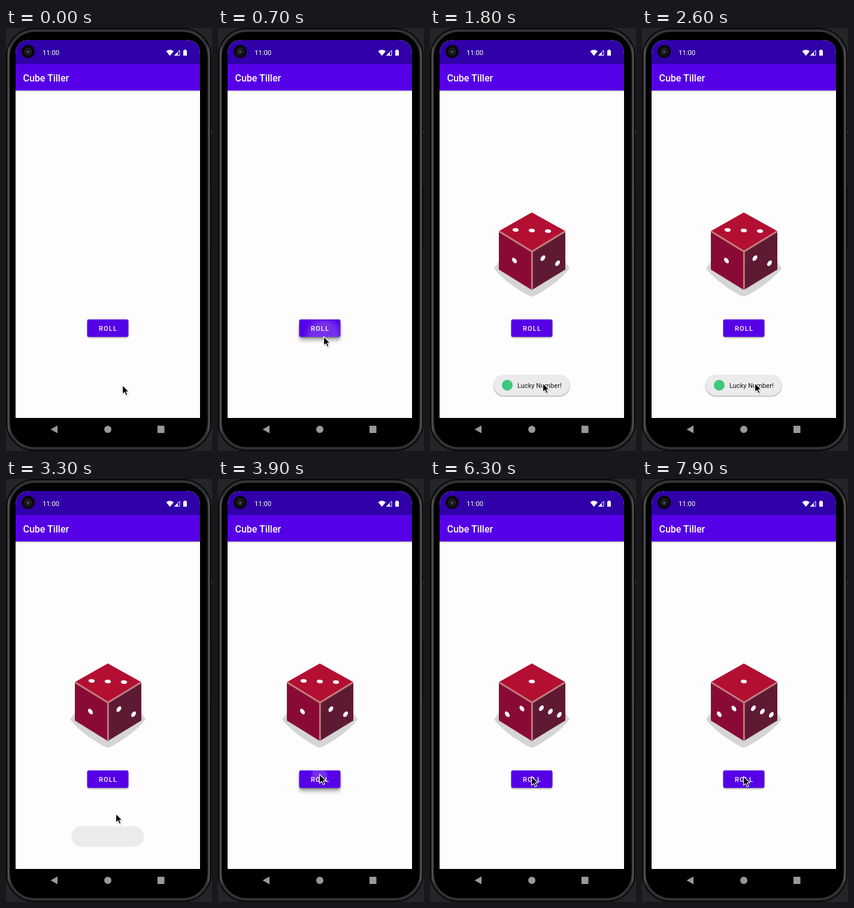
Animation, 344 px wide and 704 px high, one loop 8000 ms. Source, as an HTML page:

```html
<!DOCTYPE html>
<html lang="en">
<head>
<meta charset="utf-8">
<title>Dice app</title>
<style>
html, body { margin: 0; width: 100%; height: 100%; overflow: hidden; background: #242528; }
svg { display: block; width: 100vw; height: 100vh; }
text { font-family: Roboto, "Open Sans", sans-serif; }
</style>
</head>
<body>
<svg viewBox="0 0 344 704" xmlns="http://www.w3.org/2000/svg">
  <defs>
    <linearGradient id="rim">
      <stop offset="0" stop-color="#0b0b0b"/>
      <stop offset=".008" stop-color="#55575a"/>
      <stop offset=".02" stop-color="#2c2d2f"/>
      <stop offset=".98" stop-color="#2c2d2f"/>
      <stop offset=".992" stop-color="#55575a"/>
      <stop offset="1" stop-color="#0b0b0b"/>
    </linearGradient>
    <radialGradient id="glow">
      <stop offset=".6" stop-color="#fff"/>
      <stop offset="1" stop-color="#fff" stop-opacity="0"/>
    </radialGradient>
    <clipPath id="screen"><path d="M16 649V44Q16 20 40 20H300Q324 20 324 44V649Z"/></clipPath>
    <clipPath id="face"><rect x="135.5" y="485" width="69" height="29" rx="3"/></clipPath>
    <filter id="soft" x="-30%" y="-60%" width="160%" height="220%"><feGaussianBlur stdDeviation="1.2"/></filter>
    <filter id="softer" x="-30%" y="-60%" width="160%" height="240%"><feGaussianBlur stdDeviation="3"/></filter>
  </defs>

  <!-- phone body -->
  <rect width="344" height="704" fill="#242528"/>
  <rect x="341" y="267" width="2.5" height="97" fill="#0a0a0a"/>
  <rect x="342" y="171" width="1.5" height="2.5" fill="#bbb"/>
  <rect x="1" y="1" width="341" height="702" rx="46" fill="url(#rim)" stroke="#070707" stroke-width="2"/>
  <rect x="5.5" y="5.5" width="332" height="693" rx="42" fill="#000" stroke="#3d3f41" stroke-width="1.5"/>
  <rect x="8" y="8" width="327" height="688" rx="39" fill="#000"/>

  <!-- screen -->
  <g clip-path="url(#screen)">
    <rect x="16" y="20" width="308" height="629" fill="#fdfdfd"/>
    <rect x="16" y="102" width="308" height="3" fill="#000" opacity=".3" filter="url(#soft)"/>
    <rect x="16" y="60" width="308" height="44" fill="#5600e8"/>
    <rect x="16" y="20" width="308" height="40" fill="#3000a9"/>
  </g>
  <circle cx="37" cy="39" r="11" fill="#090909"/>
  <circle cx="37" cy="39" r="5.5" fill="#17181b" stroke="#303236"/>
  <circle cx="37" cy="39.5" r="1.8" fill="#59606c"/>
  <text x="61" y="45" font-size="11.3" fill="#fff">11:00</text>
  <text x="28.5" y="89" font-size="16" font-weight="500" fill="#fff">Cube Tiller</text>
  <g fill="#fff">
    <path d="M267.5 38.7Q273.7 33.8 280 38.7L273.7 46.3Z"/>
    <path d="M281.5 45.5L290 37V45.5Z" fill="none" stroke="#fff"/>
    <path d="M281 46L287 40V46Z"/>
    <path d="M296 37.3H297.6V36H300.4V37.3H302V46H296Z"/>
  </g>
  <g fill="#999">
    <path d="M74.5 668L86 661.5V674.5Z"/>
    <circle cx="170" cy="668" r="6"/>
    <rect x="253" y="662" width="11.5" height="12"/>
  </g>

  <!-- die -->
  <g id="die">
    <path d="M115 389L107 400Q119 416 141 431Q165 447 170 447Q175 447 199 431Q221 416 233 400L226 389Z" fill="#d5d5d5"/>
    <path d="M170 307L226 338L170 372L115 338Z" fill="#b30f32"/>
    <path d="M115 338L170 372V436L115 402Z" fill="#890b35"/>
    <path d="M226 338L170 372V436L226 402Z" fill="#5f1a33"/>
    <path d="M115.5 338.5L170.3 372L225.5 338.5M170.3 372V435.5" fill="none" stroke="#c07f7f" stroke-width="2.8"/>
    <g id="pips" fill="#fff"></g>
  </g>

  <!-- button -->
  <rect x="136" y="486.5" width="68" height="29" rx="3" opacity=".4" filter="url(#soft)"/>
  <rect id="lift" x="136" y="491" width="68" height="29" rx="4" filter="url(#softer)"/>
  <rect x="135.5" y="485" width="69" height="29" rx="3" fill="#5600e8"/>
  <g clip-path="url(#face)"><circle id="ripple" fill="url(#glow)"/></g>
  <text x="155" y="503.7" font-size="11" font-weight="500" letter-spacing="1.2" fill="#fff">ROLL</text>

  <!-- toast -->
  <g id="toast">
    <rect id="toastShade" x="106.5" y="578.5" width="126.5" height="34.5" rx="17.2" filter="url(#soft)"/>
    <rect x="106.5" y="577" width="126.5" height="35" rx="17.5" fill="#ebebec"/>
    <g id="message">
      <circle cx="129" cy="594.5" r="9" fill="#3dc980"/>
      <text x="146" y="598.7" font-size="11.1" fill="#151515">Lucky Number!</text>
    </g>
  </g>

  <!-- pointer -->
  <g id="pointer">
    <path d="M0 0V15L3.5 11.8L6 17.3L8.6 16.2L6.2 10.8H10.8Z" transform="translate(.5 1.5)" opacity=".3" filter="url(#soft)"/>
    <path d="M0 0V15L3.5 11.8L6 17.3L8.6 16.2L6.2 10.8H10.8Z" stroke="#fff" stroke-width="1.1" stroke-linejoin="round"/>
  </g>
</svg>
<script>
const LOOP = 8000, STEP = 100;
const $ = id => document.getElementById(id);
const clamp = v => Math.max(0, Math.min(1, v));

// time, x, y of the pointer tip
const path = [
  [0, 194.5, 594.5], [100, 194.5, 594.5], [500, 176.5, 513.5], [1000, 176.5, 513.5],
  [1700, 188.5, 591], [2700, 188.5, 591], [2900, 187.5, 585], [3100, 187.5, 585],
  [3300, 183.5, 557], [3700, 169.5, 491.5], [5500, 169.5, 491.5],
  [5600, 169.5, 493], [6000, 169.5, 493], [6100, 169.5, 495], [8000, 169.5, 495]
];
const presses = [550, 3800, 6310];

// pips on the top, left and right faces
const rolls = {
  3: [[[143, 336], [170, 337], [197, 338]], [[141, 387]], [[188.5, 383], [213, 391.5]]],
  1: [[[170, 337]], [[153.5, 382], [129, 391.5]], [[186, 381.5], [201, 387], [216, 392.5]]]
};
const shapes = [[5.2, 3.1, 3], [3.2, 5.3, -35], [3.2, 5.3, 35]];

const pipMarkup = roll => roll.map((face, i) => {
  const [rx, ry, turn] = shapes[i];
  return face.map(([x, y]) =>
    `<ellipse rx="${rx}" ry="${ry}" transform="translate(${x} ${y}) rotate(${turn})"/>`).join("");
}).join("");

function pointerAt(t) {
  const i = path.findIndex(p => p[0] > t);
  const [t0, x0, y0] = path[i - 1], [t1, x1, y1] = path[i];
  const k = (t - t0) / (t1 - t0);
  return [x0 + (x1 - x0) * k, y0 + (y1 - y0) * k];
}

let shown = 0;
function drawDie(t) {
  const value = t < 750 ? 0 : t < 4000 ? 3 : 1;
  if (value === shown) return;
  shown = value;
  $("die").style.display = value ? "" : "none";
  $("pips").innerHTML = value ? pipMarkup(rolls[value]) : "";
}

function drawButton(t) {
  const start = presses.filter(p => p <= t).pop() ?? -LOOP;
  const age = t - start;
  const [x, y] = pointerAt(Math.max(0, start));
  const ripple = $("ripple");
  ripple.setAttribute("cx", x);
  ripple.setAttribute("cy", y);
  ripple.setAttribute("r", 140 * clamp(age / 300) ** 2);
  ripple.setAttribute("opacity", 0.19 * clamp((750 - age) / 400));
  $("lift").setAttribute("opacity", 0.3 * Math.min(clamp(age / 100), clamp((400 - age) / 150)));
}

function drawToast(t) {
  const k = Math.min(clamp((t - 800) / 200), clamp((3300 - t) / 200));
  const scale = 0.95 + 0.05 * k;
  $("toast").style.display = t >= 900 && t < 3400 ? "" : "none";
  $("toast").setAttribute("transform",
    `translate(169.8 594.5) scale(${scale}) translate(-169.8 -594.5)`);
  $("message").setAttribute("opacity", k * k);
  $("toastShade").setAttribute("opacity", 0.08 + 0.32 * k);
}

function draw(now) {
  const t = Math.floor((now % LOOP) / STEP) * STEP;
  drawDie(t);
  drawButton(t);
  drawToast(t);
  $("pointer").setAttribute("transform", `translate(${pointerAt(t)})`);
}

$("die").style.display = "none";
const begin = performance.now();
function tick() {
  draw(performance.now() - begin);
  requestAnimationFrame(tick);
}
tick();
</script>
</body>
</html>
```
